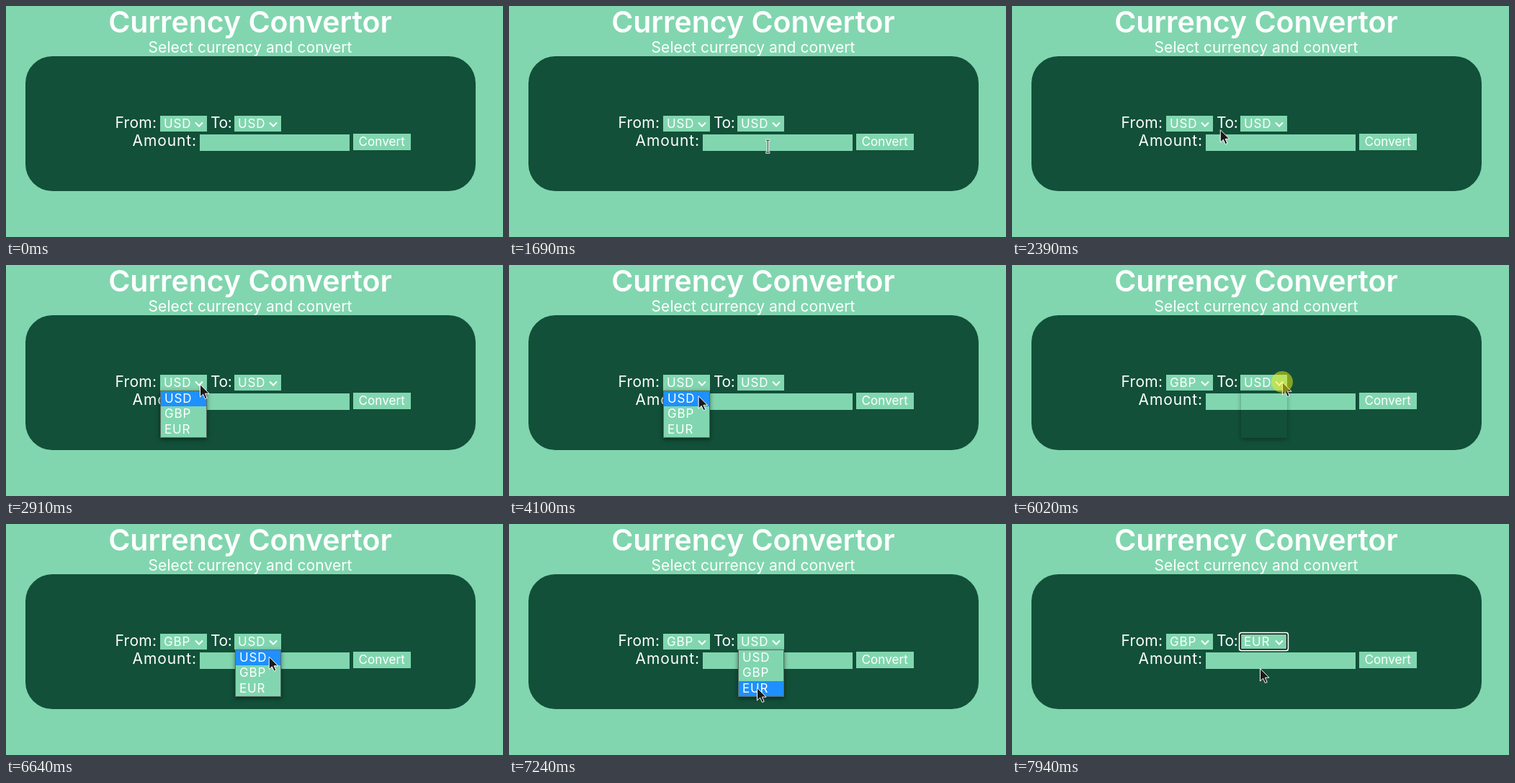
Animation, 690 px wide and 322 px high, one loop 8000 ms. Source, as an HTML page:

```html
<!DOCTYPE html>
<html lang="en">
<head>
<meta charset="utf-8">
<title>Currency Convertor</title>
<style>
  html, body { margin: 0; width: 100%; height: 100%; overflow: hidden; background: #81d6af; }
  svg { position: absolute; left: 0; top: 0; }
  text, .list { font-family: Inter, "Open Sans", sans-serif; fill: #fff; color: #fff; }
  .title { font-size: 41px; font-weight: 600; text-anchor: middle; }
  .body { font-size: 21px; }
  .control, .list { font-size: 17px; letter-spacing: .8px; }
  .mint { fill: #81d6af; }
  .line { fill: none; stroke: #fff; stroke-width: 2; }
  .list {
    position: absolute; top: 175px; width: 65px; height: 66px; box-sizing: border-box;
    border: 1px solid transparent; box-shadow: 0 2px 6px rgba(0, 0, 0, .35);
  }
  .list div { height: 21.33px; line-height: 21.33px; padding-left: 5px; visibility: hidden; }
  .list.open { background: #81d6af; border-color: #596b63; box-shadow: 0 2px 6px rgba(0, 0, 0, .5); }
  .list.open div { visibility: visible; }
  .list .hover { background: #1e90ff; }
</style>
</head>
<body>
<svg width="690" height="322">
  <rect x="27" y="70" width="625" height="188" rx="37.5" fill="#125039"/>
  <text class="title" x="339" y="37">Currency Convertor</text>
  <text class="body" x="339" y="65" text-anchor="middle" letter-spacing=".1">Select currency and convert</text>
  <text class="body" x="151.5" y="170" letter-spacing=".3">From:</text>
  <text class="body" x="284" y="170" letter-spacing="-.4">To:</text>
  <text class="body" x="175.5" y="195" letter-spacing=".9">Amount:</text>
  <rect class="mint" x="269" y="179" width="208" height="23"/>
  <rect class="mint" x="482" y="178" width="80" height="23"/>
  <text class="control" x="489.5" y="195" style="letter-spacing:.1px">Convert</text>
  <g id="selects"></g>
</svg>
<div id="lists"></div>
<svg width="690" height="322">
  <g id="pointer">
    <path id="arrow" d="M.5 .5V18L4.6 14.2 7.4 20.6 10.2 19.4 7.4 13.2H13Z" fill="#1a1a1a" stroke="#fff"/>
    <g id="beam" fill="none">
      <path d="M-3 -8.5H3M0 -8.5V8.5M-3 8.5H3" stroke="#fff" stroke-width="3"/>
      <path d="M-2.5 -8.5H2.5M0 -8.5V8.5M-2.5 8.5H2.5" stroke="#222"/>
    </g>
    <circle id="click" r="15" fill="#f0ee14" fill-opacity=".52"/>
  </g>
</svg>
<script>
const LOOP = 8000, ENTER = 990;
const codes = ["USD", "GBP", "EUR"];
const $ = id => document.getElementById(id);

// Each move: first step, last step, number of steps, destination.
const moves = [
  [1090, 1790, 8, 347, 190],
  [1890, 2610, 8, 269, 166],
  [3900, 4520, 7, 252, 209],
  [5520, 5820, 4, 375, 163],
  [6540, 7240, 8, 344, 228],
  [7640, 7940, 4, 344, 201]
];
const clicks = [[2810, 2910], [5220, 5320], [6020, 6140], [7440, 7540]];
const fields = [
  { x: 214, listX: 214, width: 65, shade: 2810, open: 2910, close: 5320, blur: 6020, pick: 1 },
  { x: 317, listX: 318, width: 64, shade: 6020, open: 6140, close: 7540, blur: LOOP, pick: 2 }
];
const during = (t, from, to) => t >= from && t < to;
const show = (node, on) => { node.style.display = on ? "" : "none"; };

for (const f of fields) {
  $("selects").insertAdjacentHTML("beforeend", `<g transform="translate(${f.x} 153)">
    <rect class="mint" width="65" height="22"/>
    <g><rect x="-1.2" y="-1.2" width="67.4" height="24.4" rx="2.5" class="line" stroke-width="1.5"/>
      <rect x=".3" y=".3" width="64.4" height="21.4" rx="1" fill="none" stroke="#101010" stroke-width="1.6"/></g>
    <text class="control" x="5" y="17">USD</text>
    <path class="line" d="M49 9.5l5 5 5-5"/></g>`);
  const group = $("selects").lastElementChild;
  f.ring = group.querySelector("g");
  f.label = group.querySelector("text");
  f.list = document.createElement("div");
  f.list.style.left = f.listX + "px";
  f.list.style.width = f.width + "px";
  f.list.innerHTML = codes.map(c => `<div>${c}</div>`).join("");
  $("lists").append(f.list);
}

function pointerAt(t) {
  let x = 573, y = 295;
  for (const [start, end, steps, toX, toY] of moves) {
    if (t < start) break;
    const gap = (end - start) / (steps - 1);
    const step = Math.min(steps, Math.floor((t - start) / gap + 1e-6) + 1);
    const p = 1 - (1 - step / steps) ** 1.4;
    x += (toX - x) * p;
    y += (toY - y) * p;
    if (step < steps) break;
  }
  return [x, y];
}

function render(t) {
  const [x, y] = pointerAt(t);
  let listOpen = false;
  for (const f of fields) {
    const open = during(t, f.open, f.close);
    listOpen ||= open;
    show(f.list, during(t, f.shade, f.close));
    f.list.className = open ? "list open" : "list";
    const hover = Math.max(0, Math.min(2, Math.floor((y - 176) / 21.33)));
    [...f.list.children].forEach((item, i) => item.classList.toggle("hover", open && i === hover));
    show(f.ring, during(t, f.close, f.blur));
    f.label.textContent = codes[t >= f.close ? f.pick : 0];
  }
  const overInput = !listOpen && x > 269 && x < 477 && y > 179 && y < 201;
  show($("pointer"), t >= ENTER);
  $("pointer").setAttribute("transform", `translate(${x} ${y})`);
  show($("beam"), overInput);
  show($("arrow"), !overInput);
  show($("click"), clicks.some(([from, to]) => during(t, from, to)));
}

const began = performance.now();
function tick() {
  render((performance.now() - began) % LOOP);
  requestAnimationFrame(tick);
}
tick();
</script>
</body>
</html>
```
